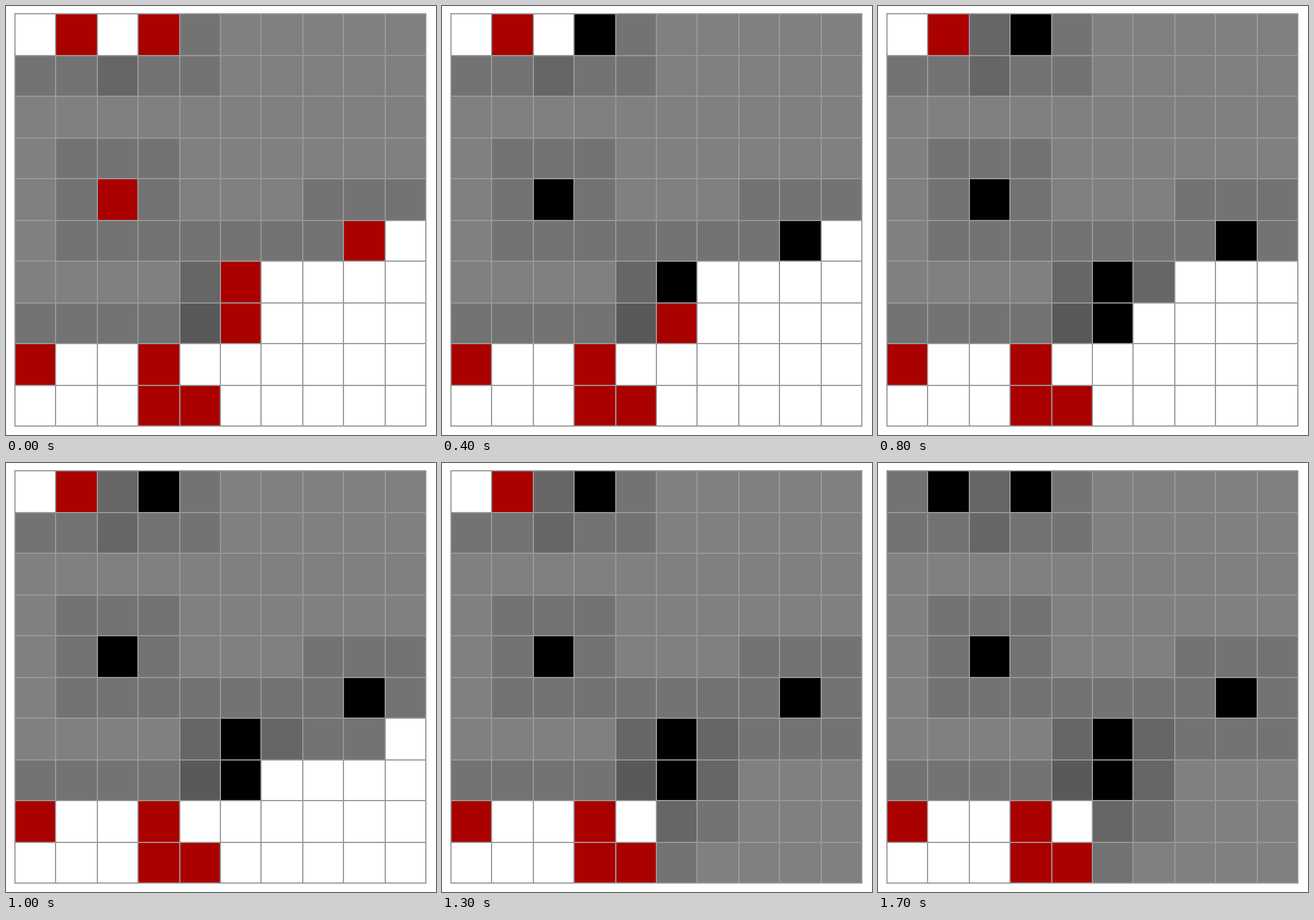
Write an HTML page with a canvas that moves like this. It is 720x718 px and loops after 1800 ms.

```html
<!DOCTYPE html>
<html>
<head>
<meta charset="utf-8">
<style>
  html, body { margin: 0; width: 100%; height: 100%; overflow: hidden; background: #fff; }
  canvas { display: block; }
</style>
</head>
<body>
<canvas id="board" width="720" height="718"></canvas>
<script>
const LOOP = 1800, STEP = 100, SIZE = 10, LINE = 2;
const columnLines = [14, 82, 152, 220, 290, 358, 426, 496, 564, 634, 702];
const rowLines = [12, 82, 150, 220, 288, 358, 426, 496, 564, 634, 702];

// Cells are named by row and column digits.
const mines = ['01', '03', '42', '58', '65', '75', '80', '83', '93', '94'];

// Step at which the solver flags a mine or opens a safe cell.
const solvedAt = {
  '03': 1, '42': 2, '58': 3, '65': 4, '75': 5, '02': 6,
  '59': 7, '66': 8, '67': 9, '68': 10, '69': 11, '76': 12,
  '01': 16, '00': 17
};
const FLOOD_STEP = 13;

const isMine = (row, col) => mines.includes(`${row}${col}`);

function solveStep(row, col) {
  const step = solvedAt[`${row}${col}`];
  if (step !== undefined) return step;
  if (row > 7 && col < 5) return Infinity;
  if (row > 7 || (row === 7 && col > 6)) return FLOOD_STEP;
  return 0;
}

function countMines(row, col) {
  let count = 0;
  for (let r = row - 1; r <= row + 1; r++)
    for (let c = col - 1; c <= col + 1; c++)
      if (isMine(r, c)) count++;
  return count;
}

function cellColor(row, col, step) {
  const solved = step >= solveStep(row, col);
  if (isMine(row, col)) return solved ? '#000' : '#a00';
  if (!solved) return '#fff';
  const shade = 128 - 13 * countMines(row, col);
  return `rgb(${shade}, ${shade}, ${shade})`;
}

const ctx = document.getElementById('board').getContext('2d');

function draw(step) {
  ctx.fillStyle = '#fff';
  ctx.fillRect(0, 0, 720, 718);
  ctx.fillStyle = '#999';
  ctx.fillRect(14, 12, 690, 692);
  for (let row = 0; row < SIZE; row++) {
    for (let col = 0; col < SIZE; col++) {
      const x = columnLines[col] + LINE, y = rowLines[row] + LINE;
      ctx.fillStyle = cellColor(row, col, step);
      ctx.fillRect(x, y, columnLines[col + 1] - x, rowLines[row + 1] - y);
    }
  }
}

const start = performance.now();
function tick() {
  draw(Math.floor(((performance.now() - start) % LOOP) / STEP));
  requestAnimationFrame(tick);
}
tick();
</script>
</body>
</html>
```
